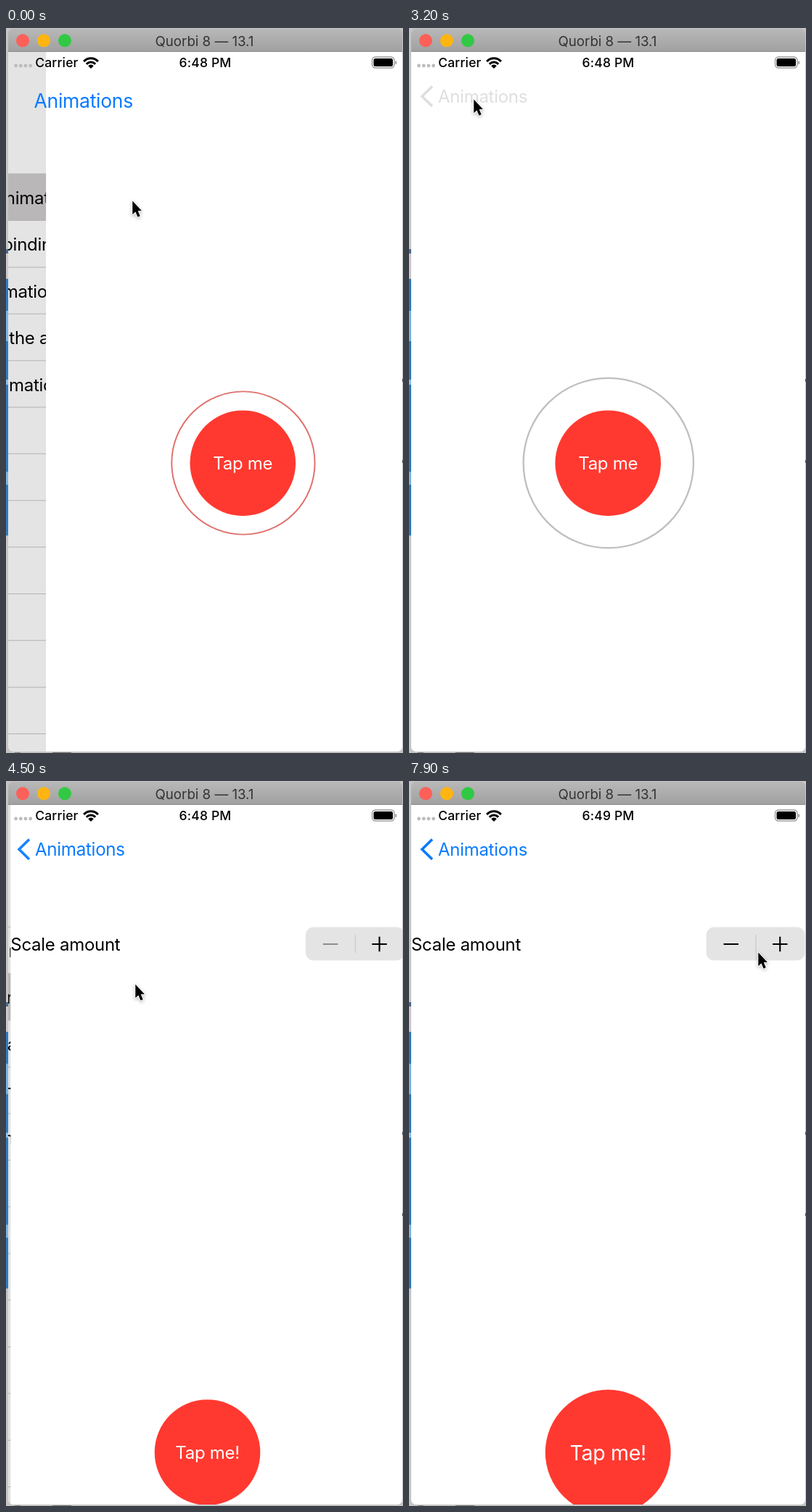
Recreate the animation shown at these times as an HTML page with a canvas. Size 547x1000 px, loop 8 s.

```html
<!DOCTYPE html>
<html lang="en">
<head>
<meta charset="utf-8">
<title>Animations demo</title>
<style>
html, body { margin: 0; width: 100%; height: 100%; overflow: hidden; background: #c6c4c5; }
canvas { display: block; width: 547px; height: 1000px; }
</style>
</head>
<body>
<canvas id="stage"></canvas>
<script>
const W = 547, H = 1000, LOOP = 8000, STEP = 100;
const LEFT = 3, RIGHT = 546, BAR = 33, BOTTOM = 998, WIDTH = RIGHT - LEFT;
const RED = '#ff3930', BLUE = '#087aff';
const POP = 3250, PUSH = 4100, GROW = 5600, CLOCK = 5300;
const ROWS = ['Pulsating animation', 'Animating bindings', 'Explicit animations',
  'Controlling the animation stack', 'Gesture animation', 'Transitions'];
const ROW_TOP = 201.2, ROW_H = 64.36;

// time, x, y of the pointer tip
const POINTER = [[0, 174, 237], [200, 174, 237], [900, 437, 617], [1800, 437, 617],
  [2750, 89, 97], [3300, 89, 97], [3900, 178, 279], [4600, 178, 279], [5400, 481, 235]];

const canvas = document.getElementById('stage');
const dpr = window.devicePixelRatio || 1;
canvas.width = W * dpr;
canvas.height = H * dpr;
const c = canvas.getContext('2d');

const clamp = v => Math.max(0, Math.min(1, v));
const mix = (a, b, p) => a + (b - a) * p;
const smooth = p => p * p * (3 - 2 * p);

// Cubic timing curve with control points (x1, 0) and (x2, 1)
function ease(x1, x2, x) {
  let lo = 0, hi = 1, s = 0.5;
  for (let i = 0; i < 24; i++) {
    s = (lo + hi) / 2;
    const bx = 3 * x1 * s * (1 - s) * (1 - s) + 3 * x2 * s * s * (1 - s) + s * s * s;
    if (bx < x) lo = s; else hi = s;
  }
  return smooth(s);
}

// Critically damped decay from 1 to 0
function settle(ms) {
  const x = Math.max(0, ms) * 0.018;
  return (1 + x) * Math.exp(-x);
}

function box(x, y, w, h, color, radius = 0) {
  c.fillStyle = color;
  c.beginPath();
  c.roundRect(x, y, w, h, radius);
  c.fill();
}

function disc(x, y, r, color) {
  c.fillStyle = color;
  c.beginPath();
  c.arc(x, y, r, 0, Math.PI * 2);
  c.fill();
}

function line(points, color, width) {
  c.strokeStyle = color;
  c.lineWidth = width;
  c.lineJoin = 'miter';
  c.beginPath();
  points.forEach(([x, y]) => c.lineTo(x, y));
  c.stroke();
}

function text(str, x, y, { size = 24, weight = 400, color = '#000', align = 'left', gap = -0.012 } = {}) {
  c.font = `${weight} ${size}px Inter, Roboto, sans-serif`;
  c.letterSpacing = `${gap * size}px`;
  c.textAlign = align;
  c.fillStyle = color;
  c.fillText(str, x, y);
}

function desktop() {
  box(0, 0, W, H, '#c6c4c5');
  box(0, 305, 3, 6, '#4a6a90');
  box(0, 311, 3, 35, '#cfc6cb');
  box(0, 346, 3, 354, '#2f7bbd');
  box(0, 390, 3, 42, '#79b4e4');
  box(0, 485, 3, 7, '#8fbfe6');
  box(0, 612, 3, 18, '#7db3de');
  box(546, 484, 1, 4, '#444');
  box(546, 596, 1, 4, '#444');
  box(12, 999, 8, 1, '#888');
  box(64, 999, 26, 1, '#777');
}

function titleBar() {
  const g = c.createLinearGradient(0, 1, 0, BAR);
  g.addColorStop(0, '#b8b8b8');
  g.addColorStop(1, '#a0a0a0');
  box(LEFT, 1, WIDTH, BAR - 1, g, [7, 7, 0, 0]);
  box(LEFT, BAR - 1, WIDTH, 1, '#8e8e8e');
  ['#fc6058', '#ffb511', '#31c944'].forEach((color, i) => disc(23 + 29 * i, 17.3, 9, color));
  text('Quorbi 8 — 13.1', 273.5, 24.5, { size: 18.7, color: '#333', align: 'center', gap: 0 });
}

function statusBar(t) {
  const style = { size: 17.5, weight: 500, gap: 0.01 };
  for (let i = 0; i < 4; i++) disc(13.6 + 6.7 * i, 52, 2.4, '#bdbbbc');
  text('Carrier', 40.2, 54, style);
  text(t < CLOCK ? '6:48 PM' : '6:49 PM', 274.5, 54, { ...style, align: 'center' });

  c.save();
  c.beginPath();
  c.moveTo(117, 56);
  c.lineTo(103, 42);
  c.lineTo(103, 36);
  c.lineTo(131, 36);
  c.lineTo(131, 42);
  c.closePath();
  c.clip();
  disc(117, 55, 4.6, '#000');
  c.strokeStyle = '#000';
  c.lineWidth = 3;
  [8, 13.2].forEach(r => {
    c.beginPath();
    c.arc(117, 55, r, 0, Math.PI * 2);
    c.stroke();
  });
  c.restore();

  c.strokeStyle = '#999';
  c.lineWidth = 1.4;
  c.beginPath();
  c.roundRect(504.5, 40, 30.5, 15, 4.5);
  c.stroke();
  box(506.5, 42, 26.5, 11, '#000', 2.5);
  box(536.3, 45.5, 1.8, 4.5, '#999', 1);
}

function list(t, off) {
  const lit = t < PUSH - 100 ? 0 : 1;
  const glow = lit || t < POP ? 1 : settle(t - POP);
  c.save();
  c.translate(-0.3 * WIDTH * (1 - off), 0);
  for (let i = 0; i < 13; i++) {
    box(25, ROW_TOP + i * ROW_H - 0.5, RIGHT - 25, 1, '#c8c7c9');
  }
  c.globalAlpha = glow;
  box(LEFT, ROW_TOP + lit * ROW_H - 0.5, WIDTH, ROW_H + 0.5, '#cfcdce');
  c.globalAlpha = 1;
  ROWS.forEach((label, i) => {
    const y = ROW_TOP + (i + 0.5) * ROW_H;
    text(label, 25, y + 9.7);
    line([[511.4, y - 9.7], [521.4, y + 0.3], [511.4, y + 10.3]], '#c4c3c5', 3.2);
  });
  c.restore();
  box(LEFT, BAR, WIDTH, BOTTOM - BAR, `rgba(0,0,0,${0.118 * (1 - off)})`);
}

function pulsePage(t) {
  const x = 274.5, y = 600.2;
  const p = ease(0, 0.58, (t / 1000 + 0.233) % 1);
  const scale = 1 + p;
  const tone = clamp((p - 0.2) / 0.35);
  const from = [255, 57, 48], to = [184, 184, 186];
  c.globalAlpha = clamp(2.3 * (1 - p));
  c.strokeStyle = `rgb(${from.map((v, i) => Math.round(mix(v, to[i], tone)))})`;
  c.lineWidth = 1.448 * scale;
  c.beginPath();
  c.arc(x + 0.3, y - 0.2, 72.8 * scale, 0, Math.PI * 2);
  c.stroke();
  c.globalAlpha = 1;
  disc(x - 0.3, y, 72.8, RED);
  text('Tap me', x - 0.3, 609, { color: '#fff', align: 'center' });
}

function stepper(enabled) {
  box(409.5, 201.5, 136, 46, '#e5e4e5', 11);
  box(477.3, 212, 1.2, 25, '#c9c8ca');
  line([[433.5, 225], [454, 225]], enabled ? '#000' : '#8c8b8d', 2.1);
  line([[501, 225], [521.5, 225]], '#000', 2.1);
  line([[511.2, 214.7], [511.2, 235.2]], '#000', 2.1);
}

function scalePage(t) {
  text('Scale amount', 3, 234);
  stepper(t >= GROW);
  const u = Math.max(0, (t - GROW) / 1000);
  const p = ease(0.42, 0.58, u % 1);
  const scale = 1 + (Math.floor(u) % 2 ? 1 - p : p);
  c.save();
  c.translate(274.2, 926);
  c.scale(scale, scale);
  disc(0, 0, 72.8, RED);
  text('Tap me!', 0, 9.2, { color: '#fff', align: 'center' });
  c.restore();
}

// Large title shrinks into the back label and grows out of it again
function navBar(t, off) {
  const pressed = t >= 3100 && t < PUSH;
  const color = pressed ? '#dfdee0' : BLUE;
  const grow = 1 + 1.12 * off;
  c.save();
  c.translate(mix(40, 25, off), mix(103, 179, off));
  c.scale(grow, grow);
  c.globalAlpha = clamp((0.75 - off) / 0.5);
  text('Animations', 0, 0, { color });
  c.scale(1 / 2.12, 1 / 2.12);
  c.globalAlpha = clamp((off - 0.25) / 0.5);
  text('Animations', 0, 0, { size: 48, weight: 700, gap: -0.015 });
  c.restore();
  c.globalAlpha = clamp(1 - off * 10.5);
  line([[32, 80.5], [18, 94.2], [32, 108]], color, 3.6);
  c.globalAlpha = 1;
}

function page(t, off) {
  c.save();
  c.translate(WIDTH * off, 0);
  const g = c.createLinearGradient(LEFT - 14, 0, LEFT, 0);
  g.addColorStop(0, 'rgba(0,0,0,0)');
  g.addColorStop(1, `rgba(0,0,0,${0.04 * off})`);
  if (t < POP + 700 || t >= PUSH) box(LEFT - 14, BAR, 14, BOTTOM - BAR, g);
  box(LEFT, BAR, WIDTH, BOTTOM - BAR, '#fff');
  c.beginPath();
  c.rect(LEFT, BAR, WIDTH, BOTTOM - BAR);
  c.clip();
  if (t < PUSH) pulsePage(t); else scalePage(t);
  c.restore();
}

function pointer(t) {
  let i = 0;
  while (i < POINTER.length - 2 && t >= POINTER[i + 1][0]) i++;
  const [t0, x0, y0] = POINTER[i], [t1, x1, y1] = POINTER[i + 1];
  const p = smooth(clamp((t - t0) / (t1 - t0)));
  c.save();
  c.translate(mix(x0, x1, p) + 0.3, mix(y0, y1, p) + 1.5);
  c.scale(0.9, 0.92);
  c.beginPath();
  [[0, 0], [0, 20.5], [4.6, 16.4], [8, 24.2], [11.6, 22.6], [8.2, 15], [14, 14.6]]
    .forEach(([x, y]) => c.lineTo(x, y));
  c.closePath();
  c.shadowColor = 'rgba(0,0,0,0.35)';
  c.shadowBlur = 4 * dpr;
  c.shadowOffsetY = 1.5 * dpr;
  c.strokeStyle = '#fff';
  c.lineWidth = 2;
  c.lineJoin = 'round';
  c.stroke();
  c.shadowColor = 'transparent';
  c.fillStyle = '#000';
  c.fill();
  c.restore();
}

// Share of the page that is still off to the right
function offset(t) {
  if (t < POP) return settle(t + 219);
  if (t < PUSH) return 1 - settle(t - POP);
  return settle(t - PUSH);
}

function draw(t) {
  const off = offset(t);
  c.setTransform(dpr, 0, 0, dpr, 0, 0);
  desktop();
  titleBar();
  c.save();
  c.beginPath();
  c.roundRect(LEFT, BAR, WIDTH, BOTTOM - BAR, [0, 0, 7, 7]);
  c.clip();
  box(LEFT, BAR, WIDTH, BOTTOM - BAR, '#fff');
  list(t, off);
  page(t, off);
  navBar(t, off);
  statusBar(t);
  c.restore();
  pointer(t);
}

const start = performance.now();
function tick() {
  const t = (performance.now() - start) % LOOP;
  draw(Math.floor(t / STEP) * STEP);
  requestAnimationFrame(tick);
}
tick();
</script>
</body>
</html>
```
